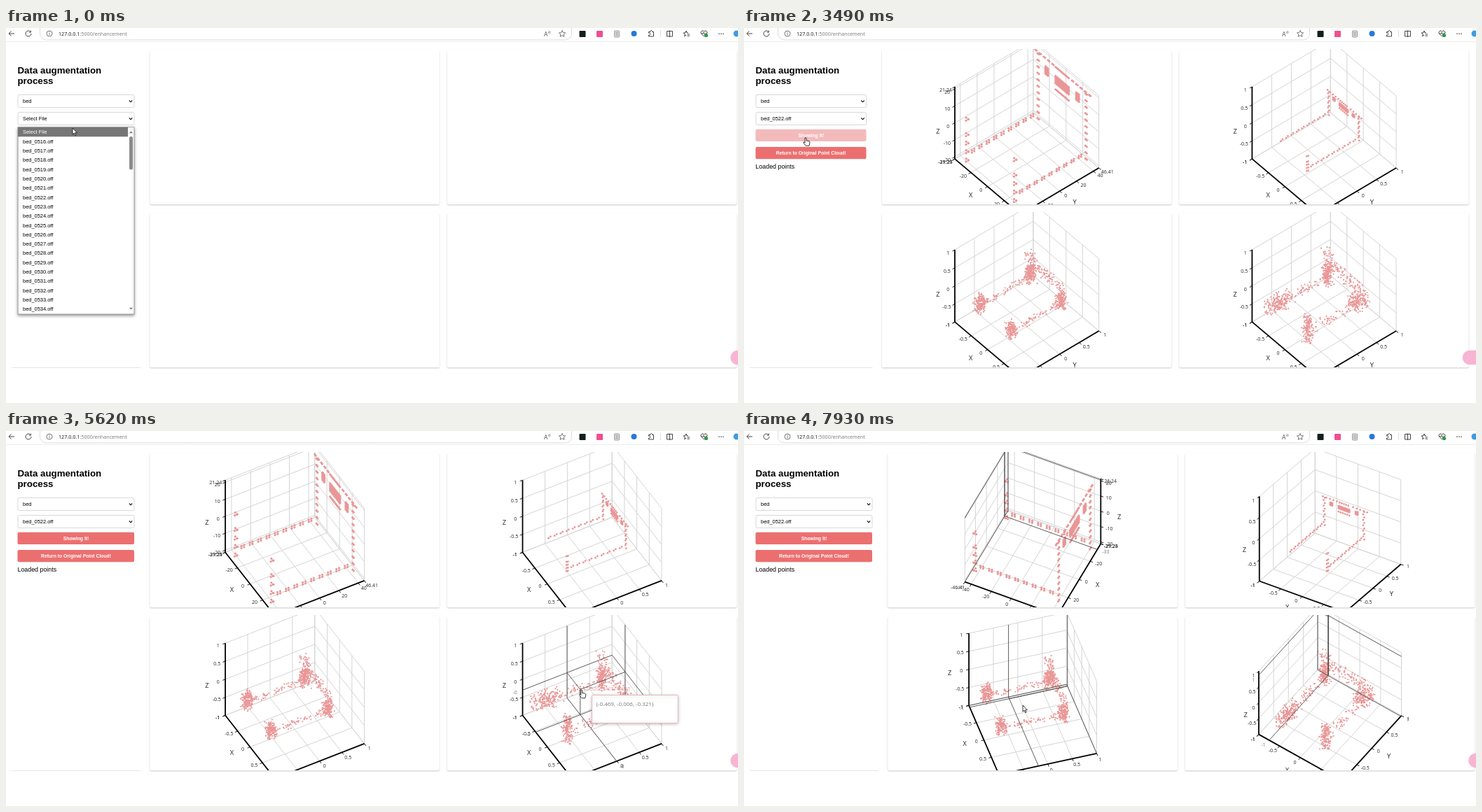
An HTML page with a canvas for the animation above (8 s loop, 1045 px wide and 536 px high).

```html
<!DOCTYPE html>
<html>
<head>
<meta charset="utf-8">
<style>
html, body { margin: 0; width: 100%; height: 100%; overflow: hidden; background: #fff }
canvas { display: block }
</style>
</head>
<body>
<canvas id="c" width="1045" height="536"></canvas>
<script>
const g = document.getElementById('c').getContext('2d');
const SANS = '"Liberation Sans", Arial, sans-serif', UI = '"Open Sans", "Noto Sans", sans-serif';
const PINK = '#e99696', RED = '#ec6f70', ROW = 13.33;

// ---------- timing ----------
const LOOP = 8000, LOADED = 2280, CHARTS = 2680;
const steps = [0, LOADED];
function addSteps(from, to, n) {
  for (let i = 0; i < n; i++) steps.push(from + Math.floor((to - from) * i / (n - 1) / 30) * 30);
}
addSteps(120, 1020, 8);
addSteps(1300, 1690, 4);
[2680, 3760, 4810, 5890, 6970].forEach(a => addSteps(a, a + (a == 3760 ? 900 : 960), 8));

const clamp = k => Math.min(1, Math.max(0, k));
const mix = (a, b, k) => a + (b - a) * k;

// keys: [time, values...]; held before the first and after the last
function along(keys, t) {
  let i = 0;
  while (i < keys.length - 1 && t >= keys[i + 1][0]) i++;
  const a = keys[i], b = keys[i + 1] || a;
  const k = a == b ? 0 : clamp((t - a[0]) / (b[0] - a[0]));
  return a.slice(1).map((v, j) => mix(v, b[j + 1], k));
}

// all charts turn slowly until the mouse drags one: start, azimuth, tilt
const drags = { 0: [6970, -25, 50.5], 1: [6400, 57, 34], 3: [5720, 54.5, 51.7] };
function view(n, t) {
  const [at, az, tilt] = drags[n] || [LOOP, 0, 0];
  const k = clamp((t - at) / 480);
  return [mix(44.1 - 5.15 * (Math.min(t, at) - CHARTS) / 1000, az, k), mix(45, tilt, k)].map(d => d * Math.PI / 180);
}

// axis pointers in chart space: time, x, y, z
const pointers = {
  0: [[7500, -.84, -1, .97]],
  2: [[7780, -.95, -.19, -1]],
  3: [[4400, -1, -.85, -.44], [4900, -1, -.85, -.44], [5490, -.469, -.006, -.3], [5720, -.469, -.006, -.3],
      [6200, -.32, .61, -1], [6300, -.32, .61, -1], [6400, -.75, .98, .87]]
};
const mouseIn = [[120, 95, 143], [1020, 91, 237], [1300, 91, 237], [1690, 84, 155], [3490, 86, 156], [3640, 200, 190], [4400, 744, 377]];
const mouseOut = [[6300, 847, 379], [6400, 790, 150], [6860, 850, 115], [6970, 470, 130], [7500, 350, 175], [7930, 398, 392]];

// ---------- point clouds ----------
let seed = 7;
const rnd = () => (seed = seed * 16807 % 2147483647) / 2147483647;
const jit = r => (rnd() * 2 - 1) * r;
const blur = r => jit(r) + jit(r * .4);

function bed() {
  const pts = [], add = (x, y, z) => pts.push([x, y, z]);
  const fill = (x0, x1, z0, z1) => {
    for (let x = x0; x < x1 + .01; x += .04) for (let z = z0; z < z1 + .01; z += .04) add(x, .9, z);
  };
  for (const s of [-1, 1]) {
    const x = s * .73;
    for (const d of [-.03, .03]) {
      for (let i = 0; i < 5; i++) {                 // foot
        const z = i ? .075 - i * .235 : .27;
        add(x + d, -.91, z); add(x, -.91 + d, z - .04);
      }
      for (let i = 0; i < 9; i++) {                 // side rail
        add(x, -.76 + i * .188 + d, -.69); add(x, -.76 + i * .188 + d, -.75);
      }
      for (let i = 0; i < 11; i++) add(x + d * .7, .9, -.9 + i * .18);
    }
    for (let h = .3; h < .85; h += .13) { add(h * s, .9, .95); add(h * s + .04, .9, .95); }
    fill(s * .47 - .04, s * .47 + .04, .52, .73);
  }
  fill(-.2, .2, .49, .71);
  fill(-.2, .2, .94, .94);
  fill(-.2, .2, .32, .32);
  return pts;
}

// k stretches the four corners in different directions
function noisy(k) {
  const pts = [], far = .47, w = .06 + .03 * k;
  const blob = (x, y, a, b, c, n) => {
    for (let i = 0; i < n; i++) pts.push([x + blur(a), y + blur(b), -.21 + blur(c)]);
  };
  blob(-far, -.8, .08, .08 + .17 * k, .18, 160);
  blob(far, -.8, .08, .08, .17 + .16 * k, 140);
  blob(-far, .48, .08, .08, .19 + .04 * k, 170);
  blob(far, .48, .08 + .08 * k, .08 + .08 * k, .19, 160);
  for (let i = 0; i < 55; i++) for (const x of [-far, far])
    pts.push([x + jit(w), -.7 + rnd() * 1.1, -.27 + jit(w)]);
  for (let i = 0; i < 80; i++) pts.push([mix(-far, far, rnd()), .48 + jit(w), .12 + jit(.14)]);
  for (let i = 0; i < 30; i++) pts.push([-far + jit(.12), .48 + jit(.09), rnd() * .45]);
  return pts;
}

const frame = bed();
const small = frame.filter((p, i) => i % 2 && (p[1] > -.9 || p[0] > 0))
  .map(([x, y, z]) => [x * .63, y * .72 - .15, z * .36]);
const clouds = [frame, small, noisy(0), noisy(1)];
const dots = [1.6, 1.4, 1.1, 1.1];

function ticks(range, step) {
  const out = [-range, range];
  for (let v = Math.ceil(-range / step) * step; v <= range; v += step) if (Math.abs(v) < range) out.push(v);
  return out;
}
const ranges = n => n ? [1, 1, 1] : [39.25, 46.41, 21.24];
const tickStep = n => n ? [.5, .5, .5] : [20, 20, 10];

// ---------- drawing helpers ----------
function line(pts, color = '#333', w = 1) {
  g.beginPath();
  pts.forEach(p => g.lineTo(p[0], p[1]));
  g.strokeStyle = color; g.lineWidth = w; g.stroke();
}
function text(s, x, y, font, color = '#000', align = 'left') {
  g.font = font; g.fillStyle = color; g.textAlign = align;
  g.fillText(s, x, y);
}
function box(x, y, w, h, r, fill, stroke, lw = 1) {
  g.beginPath(); g.roundRect(x, y, w, h, r);
  if (fill) { g.fillStyle = fill; g.fill(); }
  if (stroke) { g.strokeStyle = stroke; g.lineWidth = lw; g.stroke(); }
}
function disc(x, y, r, fill, stroke) {
  g.beginPath(); g.arc(x, y, r, 0, 7);
  if (fill) { g.fillStyle = fill; g.fill(); }
  if (stroke) { g.strokeStyle = stroke; g.lineWidth = 1; g.stroke(); }
}
function shape(x, y, d, fill, stroke, lw = .9) {
  const p = new Path2D(d);
  g.save(); g.translate(x, y);
  if (fill) { g.fillStyle = fill; g.fill(p); }
  if (stroke) { g.strokeStyle = stroke; g.lineWidth = lw; g.stroke(p); }
  g.restore();
}
function raised(color, size, y, ...args) {
  g.save();
  g.shadowColor = color; g.shadowBlur = size; g.shadowOffsetY = y;
  box(...args);
  g.restore();
}

// ---------- browser bar ----------
function toolbar() {
  const ink = '#333';
  line([[0, 19.5], [1045, 19.5]], '#ededed');
  box(48.5, -8, 759, 25, 9, '#fff', '#dcdcdc');
  shape(8, 8, 'M4 0H-4M-.5-3.5L-4 0-.5 3.5', null, ink);
  shape(32, 8, 'M4 0A4 4 0 1 1 2.6-3M3.4-4.4V-1.8H.8', null, ink);
  disc(62, 8, 4, null, '#777');
  shape(62, 8, 'M0-.7V2.3M0-2.7V-1.7', null, '#777', 1);
  text('127.0.0.1', 75, 11, '7.2px ' + UI, '#111');
  text(':5000/enhancement', 75 + g.measureText('127.0.0.1').width, 11, '7.2px ' + UI, '#777');
  text('A', 768, 11.5, '8.5px ' + UI, '#555');
  shape(775, 6, 'M-1-1Q.5 0-1 1.5M.8-2Q2.8 0 .8 2.3', null, '#555', .7);
  shape(794, 8, 'M0-4.5L1.4-1.4 4.6-1.1 2.2 1 2.9 4.3 0 2.6-2.9 4.3-2.2 1-4.6-1.1-1.4-1.4Z', null, '#555', .8);
  box(818.5, 4, 9, 9, 1, '#12211f');
  box(843, 4, 9, 9, 1, '#ee4f92');
  box(868.5, 4, 7, 9, 1, '#ddd', '#888', .8);
  shape(872, 8, 'M-2-1.5H2M-2 .5H2M-2 2.5H2', null, '#888', .7);
  disc(896.5, 8, 4, '#2878d8');
  shape(921, 8, 'M-3.5-2.5H-1A1.4 1.4 0 1 1 1.5-2.5H3.5V4H-3.5V2A1.6 1.6 0 1 0-3.5-.8Z', null, ink);
  line([[934.5, 3], [934.5, 13]], '#ddd');
  shape(947.5, 8, 'M-4-3.5H4V4H-4ZM0-4.5V5', null, ink);
  shape(971, 8, 'M0-4L1-1.2H3M0-4L-1-1.2-4-1-1.7.8-2.5 3.8 0 2.2M1.5 1H5M1.5 3.2H5', null, ink);
  shape(996.5, 8, 'M0 4L-4 0A2.4 2.4 0 0 1 0-3 2.4 2.4 0 0 1 4 0ZM-4 0H-1.5L-.4-1.6 1 1.2 1.8 0H4', null, ink);
  disc(999.5, 10.5, 2.6, '#2c9a45');
  for (const x of [1018, 1021, 1024]) disc(x, 8.2, .8, ink);
  disc(1043, 8, 4.5, '#3f9be0');
}

// ---------- left column ----------
function select(label, y, w, focus) {
  box(17, y, w, 18, 2, '#fff', focus ? '#111' : '#d8d8d8', focus ? 1.6 : 1);
  text(label, 24, y + 11.9, '7.45px ' + SANS);
  shape(12 + w, y + 8, 'M-2.2 0L0 2.3 2.2 0', null, '#111', 1.1);
}
function button(label, y, w, faded) {
  box(16.5, y, w + .5, 17.3, 2, faded ? '#f3babb' : RED);
  text(label, 17 + w / 2, y + 11.1, 'bold 6.8px ' + SANS, '#fff', 'center');
}
function list(row) {
  raised('rgba(0,0,0,.4)', 4, 2, 17, 141.5, 166, 267.5, 0, '#fff', '#8a8a8a', .7);
  g.fillStyle = '#767676';
  g.fillRect(17, 142 + row * ROW, 157, ROW);
  for (let i = 0; i < 20; i++)
    text(i ? 'bed_0' + (515 + i) + '.off' : 'Select File', 24, 151.2 + i * ROW, '7.45px ' + SANS, i == row ? '#fff' : '#000');
  box(176, 155, 5, 47.5, 2.5, '#8b8b8b');
  shape(178.5, 149, 'M-2.5 1.3L0-1.5 2.5 1.3Z', '#777');
  shape(178.5, 401, 'M-2.5-1.3L0 1.5 2.5-1.3Z', '#777');
}
function sidebar(t, w) {
  text('Data augmentation', 16.5, 65, 'bold 13.3px ' + SANS);
  text('process', 16.5, 80.3, 'bold 13.3px ' + SANS);
  select('bed', 95.5, w, false);
  select(t < 1300 ? 'Select File' : 'bed_0522.off', 120.5, w, t >= 1300 && t < LOADED);
  line([[8, 485.5], [w + 26, 485.5]], '#e4e4e4');
  if (t < 1300) return list(Math.round((along(mouseIn, t)[1] - 143.5) / ROW));
  button('Showing It!', 144.7, w, t >= 1690 && t < 3640);
  button('Return to Original Point Cloud!', 170, w, false);
  if (t >= LOADED) text('Loaded points', 16.5, 200.7, '8.85px ' + SANS);
}

// ---------- charts ----------
// returns the place of the axis pointer, if there is one
function chart(n, x0, y0, t) {
  const [az, tilt] = view(n, t);
  const S = 73, cx = x0 + 207, cy = y0 + 112;
  const sb = Math.sin(az), cb = Math.cos(az), sa = Math.sin(tilt), ca = Math.cos(tilt);
  const P = (x, y, z) => [cx + S * (x * sb + y * cb), cy + S * (sa * (x * cb - y * sb) - ca * z)];
  const back = sb > 0 ? 1 : -1, range = ranges(n);
  const marks = range.map((r, i) => ticks(r, tickStep(n)[i]));

  g.save();
  g.beginPath(); g.rect(x0, y0, 413.5, 222); g.clip();

  // a line across the floor and up the wall, or around both walls
  const across = [
    v => [P(v, -back, -1), P(v, back, -1), P(v, back, 1)],
    v => [P(1, v, -1), P(-1, v, -1), P(-1, v, 1)],
    v => [P(-1, -back, v), P(-1, back, v), P(1, back, v)]
  ];
  across.forEach((f, i) => marks[i].forEach(v => line(f(v / range[i]), '#d4d4d4')));

  for (const p of clouds[n]) disc(...P(...p), dots[n], PINK);

  const edges = [v => P(v, -back, -1), v => P(1, v, -1), v => P(-1, -back, v)];
  const norm = (x, y) => [x / Math.hypot(x, y), y / Math.hypot(x, y)];
  const side = norm(-back * cb, back * sb * sa), dirs = [side, norm(sb, cb * sa), side];
  const label = (i, v, s, color) => {
    const [x, y] = edges[i](v), [dx, dy] = dirs[i];
    g.font = '7px ' + UI;
    text(s, x + dx * 10 + Math.sign(dx) * g.measureText(s).width * .25, y + dy * 9 + 2.5, g.font, color, 'center');
  };
  edges.forEach((e, i) => {
    const [dx, dy] = dirs[i], m = e(0);
    line([e(-1), e(1)], '#000', 1.8);
    for (const s of marks[i]) {
      const [x, y] = e(s / range[i]);
      line([[x, y], [x + dx * 4, y + dy * 4]], '#000', .9);
      label(i, s / range[i], s, '#222');
    }
    text('XYZ'[i], m[0] + dx * 28, m[1] + dy * 24 + 3, '9.3px ' + UI, '#222', 'center');
  });

  let spot;
  const keys = pointers[n];
  if (keys && t >= keys[0][0]) {
    const q = along(keys, t), [x, y, z] = q;
    spot = P(...q);
    q.forEach((v, i) => {
      line(across[i](v), '#4a4a4a', .9);
      label(i, v, (v * range[i]).toFixed(0), '#777');
    });
    for (const end of [[-1, y, z], [x, back, z], [x, y, -1]]) line([spot, P(...end)], '#4a4a4a', .9);
  }
  g.restore();
  return spot;
}

function tooltip(x, y, s) {
  raised('rgba(0,0,0,.25)', 4, 1, x, y, 123, 40, 2, '#fff', '#eeb3b3', .8);
  text(s, x + 6, y + 15.4, '8px ' + UI, '#777');
}

function cursor([x, y], hand) {
  const d = hand ? 'M1 1Q2.2 0 3 1.2V5L7 5.7Q8.2 6.2 8 8L7 12.3H2.2L-1.2 8Q-1.4 6.6 0 7L1 8Z'
                 : 'M0 0V9.2L2.1 7.3 3.6 10.6 5 10 3.5 6.8H6.4Z';
  shape(x, y, d, '#fff', '#111', .85);
}

function draw(now) {
  const ms = now % LOOP, t = Math.max(...steps.filter(s => s <= ms + .5));
  const shifted = t >= CHARTS && t < 3700, dx = shifted ? -8.5 : 0;
  let spot;
  g.fillStyle = '#fff'; g.fillRect(0, 0, 1045, 536);
  for (let n = 0; n < 4; n++) {
    const x = (n % 2 ? 629.7 : 205.3) + dx, y = n < 2 ? 30 : 263;
    raised('rgba(0,0,0,.22)', 2, 1, x, y + 2, 413.5, 220.3, 2, '#fff');
    if (t >= CHARTS) spot = chart(n, x, y, t);
  }
  g.fillStyle = '#fff'; g.fillRect(196, 20, 849, 10);
  toolbar();
  sidebar(t, shifted ? 157.5 : 166);
  if (t > 4450 && t < 4900) tooltip(774, 416, '(-0.601, -1.069, -0.276)');
  if (t > 5400 && t < 5720) {
    text('-0.32053423744965', 827, 371, '7px ' + UI, '#dfa0a0');
    tooltip(836.5, 377.5, '(-0.469, -0.006, -0.321)');
  }
  box(1034.2 + dx, 460.7, 40, 20.6, 10.3, '#f8b4d3');
  const hover = t >= 1690 && t < 3640, drag = t > 5400 && t < 5760;
  cursor(t < 4400 ? along(mouseIn, t) : t < 6300 ? spot : along(mouseOut, t), hover || drag);
}

const start = performance.now();
function tick() {
  draw(performance.now() - start);
  requestAnimationFrame(tick);
}
tick();
</script>
</body>
</html>
```
